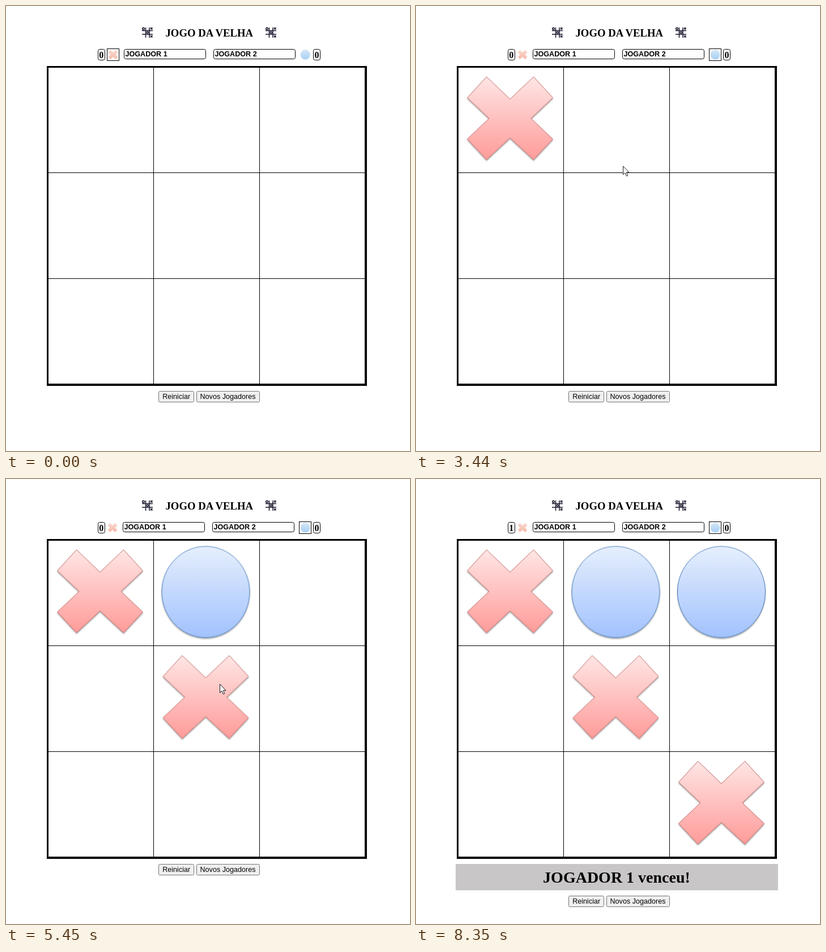
An HTML page that plays this animation: 713 px wide and 786 px high, repeating every 9.22 s.

```html
<!DOCTYPE html>
<html lang="pt">
<head>
<meta charset="utf-8">
<title>Jogo da velha</title>
<style>
  html, body { margin: 0; width: 100%; height: 100%; overflow: hidden; background: #fff; }
  svg { display: block; width: 713px; height: 786px; }
  .serif { font-family: "Liberation Serif", "Times New Roman", serif; font-weight: bold; }
  .sans { font: 12.6px "Liberation Sans", Arial, sans-serif; }
  .bold { font-weight: bold; }
  .score { font-size: 16px; text-anchor: middle; }
  .box { fill: #fff; stroke: #000; }
  .button { fill: #efefef; stroke: #767676; }
  .x { fill: url(#red); stroke: #bd6a66; filter: url(#shadow); }
  .o { fill: url(#blue); stroke: #4a7ebb; filter: url(#shadow); }
</style>
</head>
<body>
<svg viewBox="0 0 713 786">
  <defs>
    <linearGradient id="red" x2="0" y2="1"><stop stop-color="#fee6e5"/><stop offset="1" stop-color="#ff9c9a"/></linearGradient>
    <linearGradient id="blue" x2="0" y2="1"><stop stop-color="#e6effd"/><stop offset="1" stop-color="#a2c2fd"/></linearGradient>
    <linearGradient id="peach" x2="0" y2="1"><stop stop-color="#f8d8cd"/><stop offset="1" stop-color="#f8b9aa"/></linearGradient>
    <linearGradient id="sky" x2="0" y2="1"><stop stop-color="#d6e6f6"/><stop offset="1" stop-color="#a6d0f5"/></linearGradient>
    <filter id="shadow"><feDropShadow dx="0" dy="2" stdDeviation="1.3" flood-opacity=".35"/></filter>
    <path id="cross" d="M-41.5-73.5L0-34L41.5-73.5L75.5-36.5L37 0L75.5 36.5L41.5 73L0 34.5L-41.5 73L-75.5 36.5L-37 0L-75.5-36.5Z"/>
    <ellipse id="disc" rx="77.5" ry="80.5"/>
    <g id="hash" fill="none" stroke="#15152b" stroke-width="1.5">
      <path d="M6.5 1V19M13 1V19M0 6.5H19M0 13H19"/>
      <circle cx="2.5" cy="3" r="1.8"/>
      <circle cx="9.8" cy="9.8" r="1.6"/>
      <path d="M15 1L18.5 4.5M18.5 1L15 4.5M15 15L18.5 18.5M18.5 15L15 18.5"/>
    </g>
  </defs>

  <use href="#hash" x="240" y="37"/>
  <text class="serif" x="281.5" y="54" font-size="18.72">JOGO DA VELHA</text>
  <use href="#hash" x="458" y="37"/>

  <g class="serif score">
    <rect class="box" x="162.5" y="76.5" width="12" height="19" rx="3"/>
    <text id="zero" x="168.3" y="91.5">0</text>
    <text id="one" x="168.3" y="91.5">1</text>
    <rect class="box" x="542.5" y="76.5" width="12" height="19" rx="3"/>
    <text x="548.5" y="91.5">0</text>
  </g>

  <rect id="turnX" class="box" x="178.5" y="75.5" width="21" height="21"/>
  <rect id="turnO" class="box" x="517.5" y="75.5" width="21" height="21"/>
  <g id="iconX"><use href="#cross" transform="translate(188 86) scale(.108)" fill="url(#peach)" stroke="#eebcab" stroke-width="4"/></g>
  <use href="#disc" transform="translate(528.3 86) scale(.106)" fill="url(#sky)" stroke="#b5d3ef" stroke-width="4"/>

  <g id="names" class="sans bold">
    <rect class="box" x="206.5" y="76.5" width="144" height="17" rx="3"/>
    <text x="208.5" y="89">JOGADOR 1</text>
    <rect class="box" x="364.5" y="76.5" width="144" height="17" rx="3"/>
    <text x="366.5" y="89">JOGADOR 2</text>
  </g>

  <rect x="73.5" y="107.5" width="562" height="562" fill="none" stroke="#000" stroke-width="3"/>
  <path d="M260.5 109V668M447.5 109V668M633.5 109V668M75 294.5H634M75 481.5H634M75 667.5H634" stroke="#000"/>
  <g id="marks"></g>

  <g id="banner">
    <rect x="70" y="680" width="569" height="46.5" fill="#c8c6c7"/>
    <text class="serif" x="354" y="713" font-size="28" text-anchor="middle">JOGADOR 1 venceu!</text>
  </g>
  <g id="buttons" class="sans">
    <rect class="button" x="269.5" y="680.5" width="62" height="19" rx="2"/>
    <text x="300.7" y="694" text-anchor="middle">Reiniciar</text>
    <rect class="button" x="336.5" y="680.5" width="111" height="19" rx="2"/>
    <text x="391.5" y="694" text-anchor="middle">Novos Jogadores</text>
  </g>

  <g id="cursor">
    <circle id="click" r="11.3" fill="#ffff80"/>
    <path d="M.5.5V15.5L4 12.3L6.4 18L8.8 17L6.4 11.4H11Z" fill="#fff" stroke="#15151c" stroke-width="1"/>
  </g>
</svg>
<script>
const LOOP = 9220;
const WIN = 7540;
const $ = id => document.getElementById(id);
const shift = (x, y) => `translate(${x}px, ${y}px)`;

// Holds each value until the next [time, value] row.
function hold(el, prop, rows) {
  const frames = rows.map(([time, value]) => ({ offset: time / LOOP, [prop]: value, easing: 'step-end' }));
  frames.push({ offset: 1, [prop]: rows.at(-1)[1] });
  el.animate(frames, { duration: LOOP, iterations: Infinity }).startTime = 0;
}

// Visible only inside the given [from, to] spans.
function show(el, ...spans) {
  const rows = spans.flatMap(([from, to]) => [[from, 1], [to, 0]]).filter(([time]) => time < LOOP);
  if (rows[0][0] > 0) rows.unshift([0, 0]);
  hold(el, 'opacity', rows);
}

// Catmull-Rom curve through the points, u from 0 to 1.
function curve(points, u) {
  const last = points.length - 1;
  const i = Math.min(Math.floor(u * last), last - 1);
  const s = u * last - i;
  const at = n => points[Math.max(0, Math.min(last, n))];
  return [0, 1].map(axis => {
    const [a, b, c, d] = [i - 1, i, i + 1, i + 2].map(n => at(n)[axis]);
    return b + s / 2 * (c - a + s * (2 * a - 5 * b + 4 * c - d + s * (3 * (b - c) + d - a)));
  });
}

// Marks: kind, column, row, time placed
const moves = [
  ['x', 0, 0, 2080], ['o', 1, 0, 4250], ['x', 1, 1, 5450],
  ['o', 2, 0, 6530], ['x', 2, 2, WIN]
];
for (const [kind, col, row, time] of moves) {
  const mark = document.createElementNS('http://www.w3.org/2000/svg', 'use');
  mark.setAttribute('href', kind === 'x' ? '#cross' : '#disc');
  mark.setAttribute('class', kind);
  const y = kind === 'x' ? 198.5 : 199.5;
  mark.setAttribute('transform', `translate(${166 + 186.5 * col} ${y + 186.7 * row})`);
  $('marks').append(mark);
  show(mark, [time, LOOP]);
}

const turns = [0, ...moves.map(move => move[3])];
const slide = dx => turns.map((time, i) => [time, shift(i % 2 ? 0 : dx, 0)]);
show($('turnX'), [0, 2080], [4250, 5450], [6530, WIN]);
show($('turnO'), [2080, 4250], [5450, 6530], [WIN, LOOP]);
hold($('iconX'), 'transform', slide(1));
hold($('names'), 'transform', slide(2));

show($('zero'), [0, WIN]);
show($('one'), [WIN, LOOP]);
show($('banner'), [WIN, LOOP]);
hold($('buttons'), 'transform', [[0, shift(0, 0)], [WIN, shift(0, 56)]]);

// Pointer trips: first step, last step, step count, points
const trips = [
  [520, 1410, 14, [[520, 797], [343, 585], [215, 320], [146, 181]]],
  [2670, 3570, 14, [[146, 181], [255, 275], [345, 322], [368, 300], [357, 261]]],
  [3640, 3980, 6, [[357, 261], [350, 246], [347, 238]]],
  [4640, 5240, 10, [[347, 238], [352, 283], [377, 362]]],
  [5660, 6320, 10, [[377, 362], [392, 365], [450, 310], [486, 264]]],
  [6600, 7470, 14, [[486, 264], [376, 400], [243, 450], [370, 500], [507, 551]]],
  [8000, 8280, 5, [[507, 551], [496, 630], [450, 711]]]
];
const path = [[0, shift(520, 797)]];
for (const [from, to, count, points] of trips) {
  for (let k = 0; k < count; k++) {
    const time = from + (to - from) * k / (count - 1);
    path.push([time, shift(...curve(points, (k + 1) / count))]);
  }
}
hold($('cursor'), 'transform', path);
show($('cursor'), [520, 8350]);
show($('click'), [1940, 2080], [4110, 4250], [5310, 5450], [6390, 6530], [7470, WIN]);

// Start every part together at load.
const start = document.timeline.currentTime;
document.getAnimations().forEach(part => { part.startTime = start; });
</script>
</body>
</html>
```
